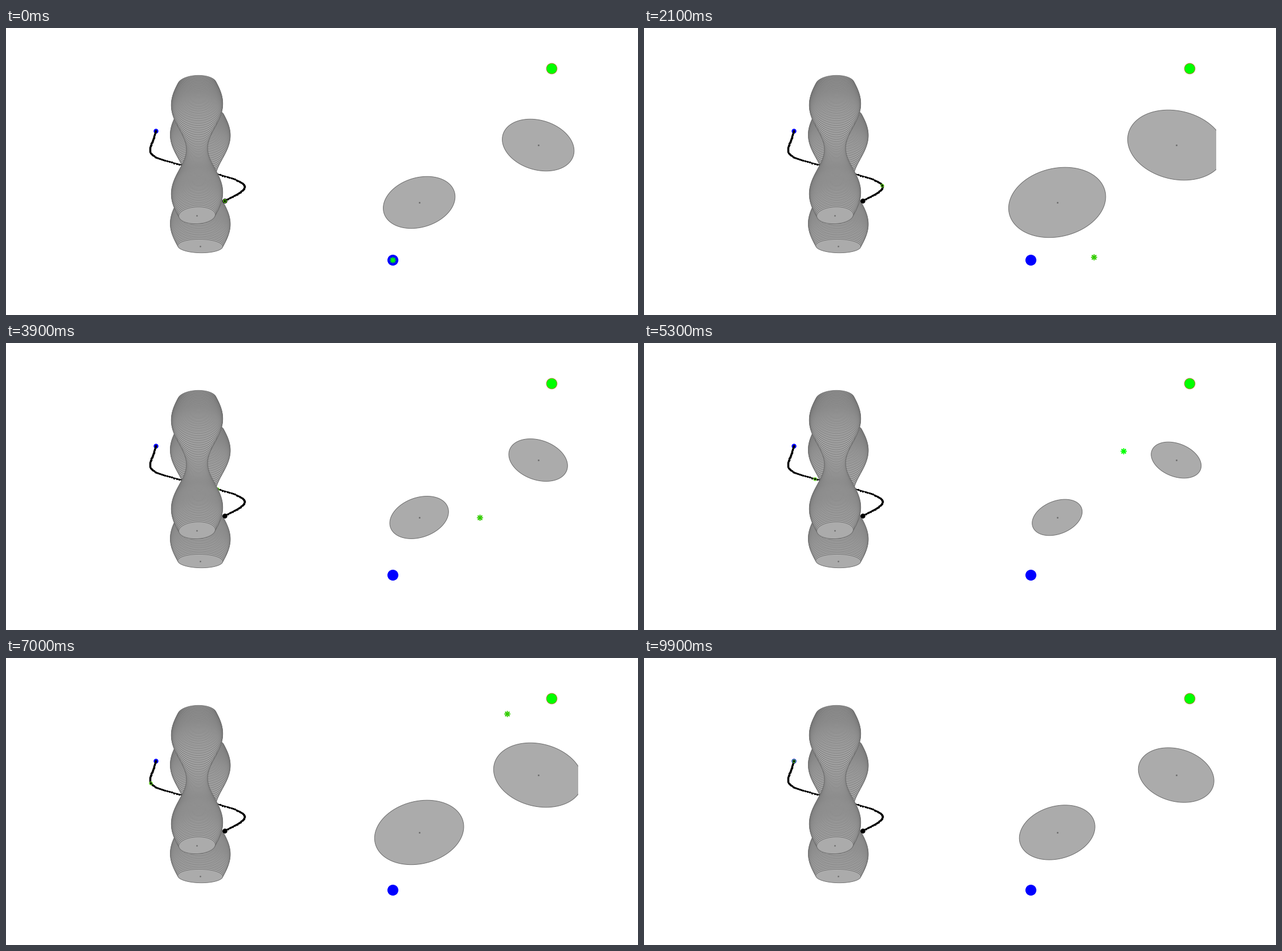
These frames come from a looping animation (1110x505 px, 10 s). A matplotlib script:

```python
import numpy as np
import matplotlib.pyplot as plt
from matplotlib.animation import FuncAnimation
from matplotlib.collections import PolyCollection
from matplotlib.patches import Polygon

W, H, DPI = 1110, 505, 100
FRAMES = 100
PT = 72 / DPI  # points per pixel

FILL, EDGE, DOT = "#ababab", "#6c6c6c", "#707070"
BRIGHT, DARK = "#00ff00", "#33cc00"

# Way points of the route: step, x, y, time
KNOTS = np.array([
    (0, 0, 0, 0),
    (12, 1.54, -0.24, 1.09),
    (22, 2.46, 0.22, 1.95),
    (28, 2.897, 0.92, 2.52),
    (33, 3.14, 1.73, 3.01),
    (53, 3.50, 6.48, 5.30),
    (66, 4.09, 8.84, 6.64),
    (77, 4.77, 9.585, 7.58),
    (86, 5.308, 9.79, 8.26),
    (99, 6, 10, 9.28),
])
# Obstacles: x, y, direction of the tilt
NEAR = (1, 3, 1)
FAR = (5.5, 6, -1)


def spline(xk, yk, x):
    """Natural cubic spline through (xk, yk), evaluated at x."""
    n, h = len(xk), np.diff(xk)
    slope = np.diff(yk) / h
    a, r = np.eye(n), np.zeros(n)
    for i in range(1, n - 1):
        a[i, i - 1:i + 2] = h[i - 1], 2 * (h[i - 1] + h[i]), h[i]
        r[i] = 6 * (slope[i] - slope[i - 1])
    m = np.linalg.solve(a, r)
    j = np.clip(np.searchsorted(xk, x, side="right") - 1, 0, n - 2)
    d = x - xk[j]
    b = slope[j] - h[j] * (2 * m[j] + m[j + 1]) / 6
    return yk[j] + d * (b + d * (m[j] / 2 + d * (m[j + 1] - m[j]) / (6 * h[j])))


def flat(x, y):
    return np.column_stack([679.2 + 46.45 * x, 407.9 - 33.65 * y])


def space(x, y, t):
    return np.column_stack([384.2 + 15.55 * x - 21.42 * y,
                            303.6 + 8 * x + 6 * y - 24.85 * t])


def ellipse(obstacle, t):
    """Outline of an obstacle whose axes swell and shrink with time."""
    cx, cy, tilt = obstacle
    swell = 0.5 * np.sin(t)
    ang = np.linspace(0, 2 * np.pi, 90)
    u = (1.5 + swell) * np.cos(ang) / np.sqrt(2)
    v = (1.2 + swell) * np.sin(ang) / np.sqrt(2)
    return cx + u - tilt * v, cy + tilt * u + v


steps = np.arange(FRAMES)
px, py, pt = (spline(KNOTS[:, 0], KNOTS[:, c], steps) for c in (1, 2, 3))
route2d, route3d = flat(px, py), space(px, py, pt)

fig = plt.figure(figsize=(W / DPI, H / DPI), dpi=DPI, facecolor="white")
ax = fig.add_axes([0, 0, 1, 1])
ax.set_xlim(0, W)
ax.set_ylim(H, 0)
ax.axis("off")


def disc(p, radius, color, z, edge="none"):
    ax.plot([p[0]], [p[1]], "o", ms=2 * radius * PT, mfc=color, mec=edge,
            mew=0.8 * PT, zorder=z, snap=False)


def tube(obstacle, z):
    rings = [space(*ellipse(obstacle, t), t) for t in pt[::-1]]
    ax.add_collection(PolyCollection(rings, facecolors=FILL, edgecolors=EDGE,
                                     linewidths=0.9 * PT, zorder=z))
    cx, cy, _ = obstacle
    disc(space(cx, cy, 0)[0], 1.4, DOT, z + 0.1)


# Space-time view
tube(FAR, 1)
disc(route3d[-1], 4.2, "#0000ff", 2)
ax.plot(*route3d.T, "o-", color="black", lw=1.8 * PT, ms=3.5 * PT, mew=0,
        zorder=2.2, snap=False)
tube(NEAR, 4)
disc(route3d[0], 4.3, "black", 3)
ring, = ax.plot([], [], "o", color="#55cc11", ms=5.2 * PT, mfc="none",
                mew=1.3 * PT, zorder=3.2, snap=False)

# Plan view
window = Polygon([(633, 38), (1004.5, 38), (1004.5, 449.5), (633, 449.5)],
                 transform=ax.transData)
plan = PolyCollection([], facecolors=FILL, edgecolors=EDGE, linewidths=PT,
                      zorder=1)
ax.add_collection(plan)
plan.set_clip_path(window)
for ox, oy, _ in (NEAR, FAR):
    disc(flat(ox, oy)[0], 1.5, DOT, 2)
disc(flat(0, 0)[0], 9.6, "#0000ff", 3)
disc(flat(6, 10)[0], 9.4, BRIGHT, 3, edge="#c07030")
star, = ax.plot([], [], marker=(8, 2, 0), ms=10.5 * PT, mew=1.5 * PT,
                ls="none", zorder=5, snap=False)


def update(i):
    plan.set_verts([flat(*ellipse(o, pt[i])) for o in (NEAR, FAR)])
    bright = i < 6 or 41 <= i < 62 or i >= 79
    star.set_data(route2d[i:i + 1].T)
    star.set_color(BRIGHT if bright else DARK)
    ring.set_data(route3d[i:i + 1].T)
    return plan, star, ring


anim = FuncAnimation(fig, update, frames=FRAMES, interval=100, repeat=True,
                     repeat_delay=0, blit=False)
plt.show()
```
